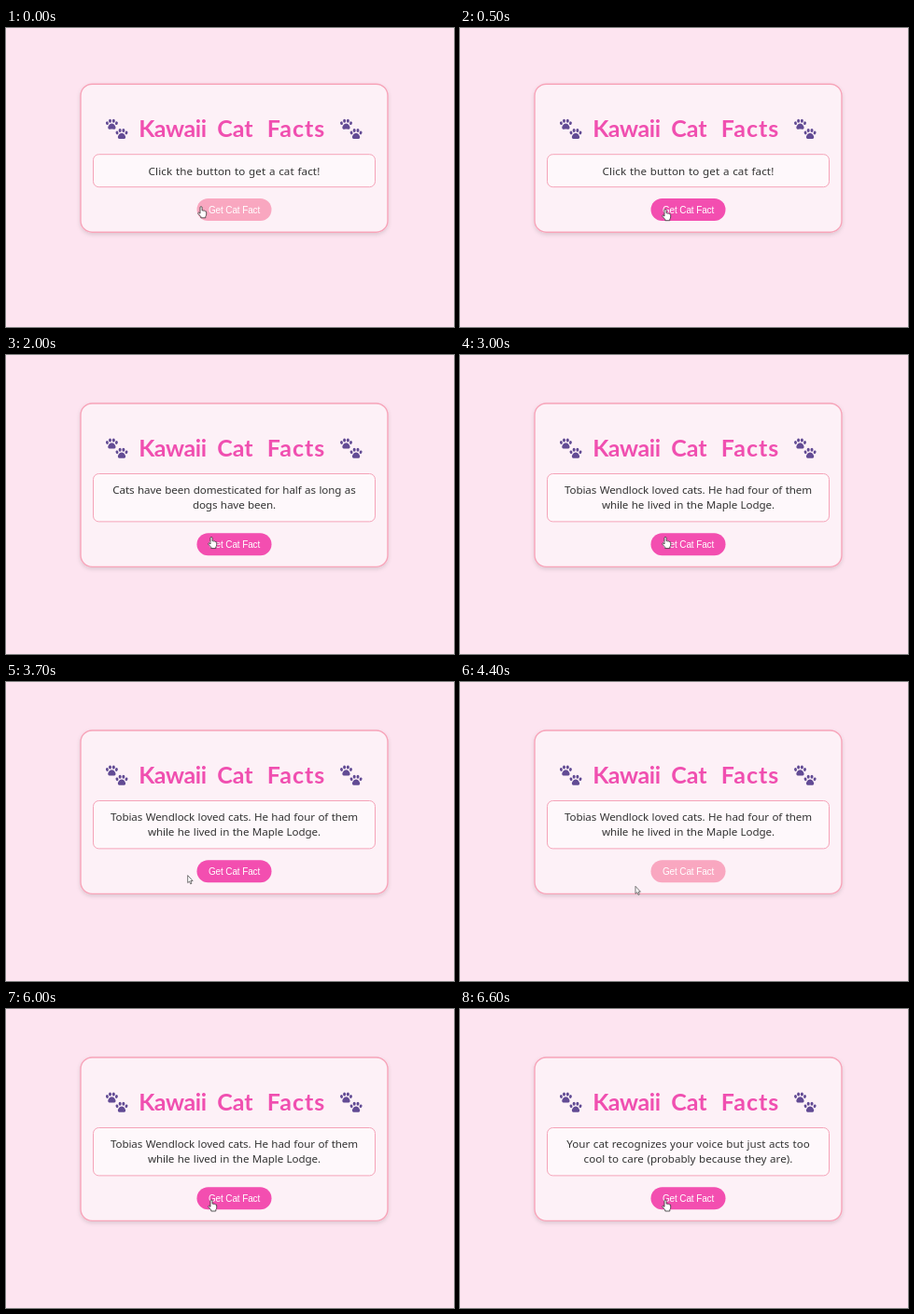
Write an HTML page that moves like this. It is 480 px wide and 321 px high and loops after 6.7 s.

```html
<!DOCTYPE html>
<html lang="en">
<head>
<meta charset="utf-8">
<title>Kawaii Cat Facts</title>
<style>
  html, body { margin: 0; width: 100%; height: 100%; overflow: hidden; background: #fde4f0; }
  svg { display: block; width: 100vw; height: 100vh; }
  text { text-anchor: middle; }
  .title { font: bold 25px Lato, sans-serif; fill: #f04fb0; }
  .fact { font: 11.6px "Noto Sans", sans-serif; word-spacing: .5px; fill: #333; }
  .label { font: 10px "Liberation Sans", Arial, sans-serif; letter-spacing: -.12px; fill: #fff; }
</style>
</head>
<body>
<svg viewBox="0 0 480 321" preserveAspectRatio="none">
  <defs>
    <filter id="shadow" x="-10%" y="-10%" width="120%" height="125%">
      <feDropShadow dx="0" dy="2" stdDeviation="2" flood-color="#000" flood-opacity=".13"/>
    </filter>
    <g id="paw">
      <ellipse cx="-5" cy="-.9" rx="1.4" ry="1.9" transform="rotate(-18 -5 -.9)"/>
      <ellipse cx="-1.9" cy="-3.4" rx="1.5" ry="2"/>
      <ellipse cx="1.9" cy="-3.4" rx="1.5" ry="2"/>
      <ellipse cx="5" cy="-.9" rx="1.4" ry="1.9" transform="rotate(18 5 -.9)"/>
      <path d="M0-.7C2.3-.7 4.3 2.2 4.1 4.1C3.9 6 1.7 5.5 0 5.5S-3.9 6-4.1 4.1C-4.3 2.2-2.3-.7 0-.7Z"/>
    </g>
    <g id="paws" fill="#624b94">
      <use href="#paw" x="-5.3" y="-5.5"/>
      <use href="#paw" x="5.3" y="4.8"/>
    </g>
  </defs>

  <rect width="480" height="321" fill="#fde4f0"/>
  <rect id="card" x="80" width="329" rx="12.3" fill="#fdf1f7" stroke="#f7a4b9" stroke-width="1.4" filter="url(#shadow)"/>
  <g id="heading">
    <use href="#paws" x="118.7" y="108.6"/>
    <text class="title" y="117"><tspan x="181.5" letter-spacing="-.4">Kawaii</tspan> <tspan x="248.5">Cat</tspan> <tspan x="311" letter-spacing="1">Facts</tspan></text>
    <use href="#paws" x="369.8" y="108.6"/>
  </g>
  <rect id="box" x="93.5" width="302" rx="6" fill="#fef8fb" stroke="#f5a3b8"/>
  <text id="line0" class="fact" x="244.5"></text>
  <text id="line1" class="fact" x="244.5"></text>
  <g id="button">
    <rect id="pill" x="204.5" y="183" width="80" height="24" rx="12"/>
    <text class="label" x="244.5" y="198.5">Get Cat Fact</text>
  </g>
  <g id="cursor" stroke-linejoin="round">
    <path id="hand" fill="#fff" stroke="#333" stroke-width=".8"
      d="M-1 1Q-1-.2 0-.2T1.1 1V4.2Q2.2 3.6 2.8 4.5Q3.8 4 4.3 4.9Q5.7 4.6 5.7 6V8.3Q5.5 9.8 4.8 10.5V12H-.2V10.8L-3 7.7Q-3.5 6.3-2.4 6.2L-1 7.4Z"/>
    <path id="arrow" fill="#fff" stroke="#555" stroke-width=".8"
      d="M0 0V8L1.8 6.4L3 9.2L4.3 8.6L3.1 5.9H5.4Z"/>
  </g>
</svg>
<script>
const LOOP = 6700, STEP = 100, FADE = 300;
const $ = id => document.getElementById(id);

const facts = [
  { from: 0, gap: .12, lines: ["Click the button to get a cat fact!"] },
  { from: 1800, gap: -.08, lines: ["Cats have been domesticated for half as long as", "dogs have been."] },
  { from: 2900, gap: -.08, lines: ["Tobias Wendlock loved cats. He had four of them", "while he lived in the Maple Lodge."] },
  { from: 6200, gap: .03, lines: ["Your cat recognizes your voice but just acts too", "cool to care (probably because they are)."] }
];

// time, x, y of the pointer tip
const path = [
  [0, 209, 191.8], [500, 220, 194.7], [1500, 220, 194.7], [1800, 220, 195.6],
  [3300, 220, 195.6], [3700, 194.7, 207.6], [4100, 188, 219.3],
  [5100, 188, 219.3], [5600, 208, 206], [6000, 220, 205], [LOOP, 220, 205]
];

// hover level targets: time, level
const hovers = [[0, 1], [3700, 0], [5600, 1]];

const mix = (a, b, k) => a + (b - a) * k;
const ease = k => k * k * (3 - 2 * k);
const clamp = k => Math.max(0, Math.min(1, k));

function pointerAt(t) {
  const i = path.findIndex(p => p[0] > t);
  const [a, b] = [path[i - 1], path[i]];
  const k = ease((t - a[0]) / (b[0] - a[0]));
  return [mix(a[1], b[1], k), mix(a[2], b[2], k)];
}

function hoverAt(t) {
  const [start, level] = hovers.filter(h => h[0] <= t).pop();
  return mix(1 - level, level, ease(clamp((t - start) / FADE)));
}

function set(id, attrs) {
  for (const name in attrs) $(id).setAttribute(name, attrs[name]);
}

function draw(t) {
  const fact = facts.filter(f => f.from <= t).pop();
  const grow = fact.lines.length > 1 ? 8.2 : 0;
  set("card", { y: 60.2 - grow, height: 159 + 2 * grow });
  set("box", { y: 135.7 - grow, height: 35 + 2 * grow });
  set("heading", { transform: `translate(0 ${-grow})` });
  set("button", { transform: `translate(0 ${grow})` });
  for (const i of [0, 1]) {
    $("line" + i).textContent = fact.lines[i] || "";
    set("line" + i, { y: 157.6 - grow + i * 16, "letter-spacing": fact.gap });
  }

  const level = hoverAt(t);
  const [idle, hot] = [[249, 167, 192], [243, 78, 176]];
  const rgb = idle.map((c, i) => Math.round(mix(c, hot[i], level)));
  set("pill", { fill: `rgb(${rgb})` });

  const [x, y] = pointerAt(t);
  const over = x >= 204.5;
  set("cursor", { transform: `translate(${x} ${y})` });
  set("hand", { visibility: over ? "visible" : "hidden" });
  set("arrow", { visibility: over ? "hidden" : "visible" });
}

const start = performance.now();
function tick() {
  const t = (performance.now() - start) % LOOP;
  draw(Math.floor(t / STEP) * STEP);
  requestAnimationFrame(tick);
}
tick();
</script>
</body>
</html>
```
